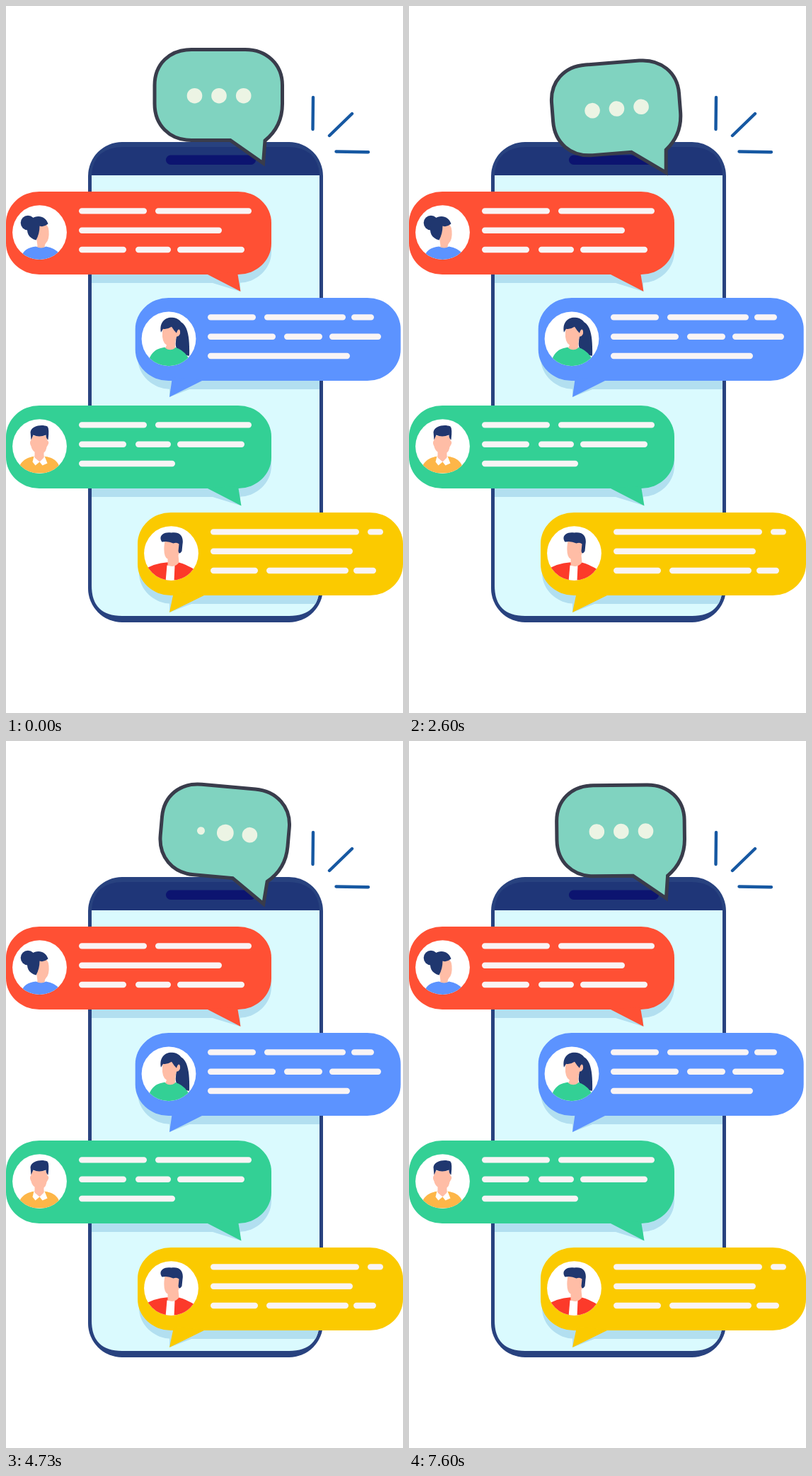
Recreate the animation shown at these times as an HTML page. Size 561x998 px, loop 7.66 s.

```html
<!DOCTYPE html>
<html lang="en">
<head>
<meta charset="utf-8">
<title>Chat bubbles</title>
<style>
  html, body { margin: 0; width: 100%; height: 100%; overflow: hidden; background: #fff; }
  svg { display: block; width: 561px; height: 998px; }
  .navy { fill: #20376f; }
  .skin { fill: #ffbda6; }
  .line { stroke: #f9f4f5; stroke-width: 8.4; stroke-linecap: round; }
</style>
</head>
<body>
<svg viewBox="0 0 561 998">
  <defs>
    <clipPath id="screen"><path d="M121 239H443V818Q443 861 400 861H164Q121 861 121 818Z"/></clipPath>
    <clipPath id="face"><circle r="38.4"/></clipPath>
  </defs>

  <!-- phone -->
  <rect x="116" y="192" width="332" height="678" rx="48" fill="#28427f"/>
  <path d="M121 239V238Q124 199 166 199H398Q440 199 443 238V239Z" fill="#1f3678"/>
  <rect x="226" y="210.5" width="127" height="13.5" rx="6.7" fill="#0c1470"/>
  <path d="M121 239H443V818Q443 861 400 861H164Q121 861 121 818Z" fill="#dafafe"/>
  <g id="shadows" clip-path="url(#screen)" fill="#b2dff0"></g>
  <g id="messages"></g>

  <!-- avatars, each centred on its own circle -->
  <g transform="translate(47.5 319.6)">
    <circle r="38.4" fill="#fff"/>
    <g clip-path="url(#face)">
      <path class="skin" d="M0-13Q12-15 13-2Q14 10 9 15Q7 17 7 21L9 25H-5L-3 19L-5 4Z"/>
      <path d="M-27 38C-24 25-16 21-5 20Q2 24 9 20Q22 22 29 31V40H-27Z" fill="#5c93ff"/>
      <circle class="navy" cx="-16.5" cy="-13.5" r="10.3"/>
      <path class="navy" d="M-17-10C-13-26 8-27 12-12Q6-7 0-9Q0 2-5 11C-16 8-19 0-17-10Z"/>
    </g>
  </g>
  <g transform="translate(230 469.8)">
    <circle r="38.4" fill="#fff"/>
    <g clip-path="url(#face)">
      <path class="navy" d="M12-25C25-24 30-8 29 24C16 23 8 15 10 4Z"/>
      <path d="M-30 38C-27 19-18 14-6 12Q3 16 9 12Q22 16 29 29V40H-30Z" fill="#33d095"/>
      <path class="skin" d="M-8-19H12L16-11Q17-4 11-3Q9 3 9 13Q2 18-5 13L-3 9Q-10 5-9-10Z"/>
      <path class="navy" d="M-11-9C-14-24-4-31 5-30C18-29 22-18 17-12Q13-16 11-8Q7-12 4-17Q-2-13-8-14Z"/>
    </g>
  </g>
  <g transform="translate(47.5 621.6)">
    <circle r="38.4" fill="#fff"/>
    <g clip-path="url(#face)">
      <path d="M-31 38C-29 20-18 16-7 14H6C19 16 28 20 30 38Z" fill="#fdb648"/>
      <path d="M-8 14L0 18L7 14L11 24L4 27L0 22L-6 27L-10 22Z" fill="#fff"/>
      <path class="skin" d="M-12-15H11V-8Q15-6 10 1Q9 7 6 9V16L0 22L-7 16V8Q-11 5-12 0Q-15-5-12-9Z"/>
      <path class="navy" d="M-12-9L-13-20C-11-30 4-31 11-28Q14-25 12-9Q9-11 9-16Q-1-12-9-16Z"/>
    </g>
  </g>
  <g transform="translate(233.5 772.6)">
    <circle r="38.4" fill="#fff"/>
    <g clip-path="url(#face)">
      <path d="M-38 38V23Q-23 14-7 13L7 12Q24 16 36 25V38Z" fill="#fc3a2a"/>
      <path d="M-6 17H5L4 40H-8Z" fill="#fff"/>
      <path class="skin" d="M-9-18H11L14-5Q11-1 10 3L11 13Q5 21-5 17V8Q-11 5-10-10Z"/>
      <path class="navy" d="M-13-16C-19-24-11-31 0-29C11-31 18-25 16-13L15-3Q11 3 10-3L11-13Q8-16 3-14Q-5-18-13-16Z"/>
    </g>
  </g>

  <path d="M434 129L433.5 174M457 183L489 152M466.5 205.5L512 206.3"
        fill="none" stroke="#1658a2" stroke-width="4.4" stroke-linecap="round"/>

  <g id="typing">
    <path d="M262 61.5H338C368 61.5 390.5 82 390.5 112V138C390.5 160 382 177 366 190L363.5 222L317 189.5H262C231 189.5 210 168 210 138V112C210 82 231 61.5 262 61.5Z"
          fill="#80d3c0" stroke="#393c4b" stroke-width="5"/>
    <g id="dots" fill="#ecf4e4">
      <circle cx="266.5" cy="126.7"/><circle cx="301" cy="126.7"/><circle cx="335.7" cy="126.7"/>
    </g>
  </g>
</svg>
<script>
const NS = 'http://www.w3.org/2000/svg';
const $ = id => document.getElementById(id);

function add(parent, tag, attrs) {
  const el = document.createElementNS(NS, tag);
  for (const key in attrs) el.setAttribute(key, attrs[key]);
  parent.append(el);
}

// rows hold start/end pairs of the text bars
const messages = [
  { x: 0, y: 262, color: '#ff5034', tail: 'M283 378L331.5 403L327 376Z',
    shade: 'M230 391L292 391L331 403V376H230Z', sx: 0,
    rows: [[103, 199, 211, 347], [103, 305], [103, 170, 183, 233, 242, 337]] },
  { x: 182.7, y: 412, color: '#5c93ff', tail: 'M279 528L231 552L235 524Z',
    shade: 'M290 540L262 540L231 552V526H290Z', sx: 3.5,
    rows: [[285, 353, 365, 480, 488, 520], [285, 381, 393, 447, 457, 530], [285, 486]] },
  { x: 0, y: 564, color: '#33d095', tail: 'M283 680L332.5 705.5L328 678Z',
    shade: 'M230 693L292 693L331 705V678H230Z', sx: 0,
    rows: [[103, 199, 211, 347], [103, 170, 183, 233, 242, 337], [103, 239]] },
  { x: 186, y: 715, color: '#fbca00', tail: 'M282 831L231 856L237 827Z',
    shade: 'M290 844L262 844L231 856V829H290Z', sx: 2,
    rows: [[289, 499, 511, 533], [289, 490], [289, 356, 368, 484, 491, 523]] }
];

for (const m of messages) {
  const box = { width: 375, height: 117, rx: 47, ry: 44 };
  add($('shadows'), 'rect', { x: m.x + m.sx, y: m.y + 12, ...box });
  add($('shadows'), 'path', { d: m.shade });
  add($('messages'), 'rect', { x: m.x, y: m.y, ...box, fill: m.color });
  add($('messages'), 'path', { d: m.tail, fill: m.color });
  m.rows.forEach((row, r) => {
    const y = m.y + 27.4 + r * 27.3;
    for (let i = 0; i < row.length; i += 2)
      add($('messages'), 'line', { class: 'line', x1: row[i] + 4.2, x2: row[i + 1] - 4.2, y1: y, y2: y });
  });
}

const LOOP = 7660, SWING = LOOP / 2, PULSE = LOOP / 4;
const POP = 190, STAGGER = 85, HIDE = 728, SHOW = 1376;
const dots = [...$('dots').children];
const clamp = v => Math.min(1, Math.max(0, v));
const backIn = u => u * u * (2.70158 * u - 1.70158);

function dotScale(t, i) {
  const from = t - i * STAGGER;
  return from < SHOW
    ? 1 - backIn(clamp((from - HIDE) / POP))
    : 1 - backIn(1 - clamp((from - SHOW) / POP));
}

// every 800 ms: one 70 ms hold, then even steps
function stepped(t) {
  const local = t % 800, step = 730 / 19;
  return t - local + (local < 70 ? 0 : 70 + Math.floor((local - 70) / step) * step);
}

function draw(now) {
  const t = stepped(now % LOOP);
  const a = t / SWING * 2 * Math.PI;
  const y = 9 * (1 - Math.cos(a));
  $('typing').setAttribute('transform', `translate(0 ${y}) rotate(${5 * Math.sin(a)} 364 226)`);
  dots.forEach((dot, i) => dot.setAttribute('r', Math.max(0, 10.8 * dotScale(t % PULSE, i))));
}

const start = performance.now();
function tick() {
  draw(performance.now() - start);
  requestAnimationFrame(tick);
}
tick();
</script>
</body>
</html>
```
